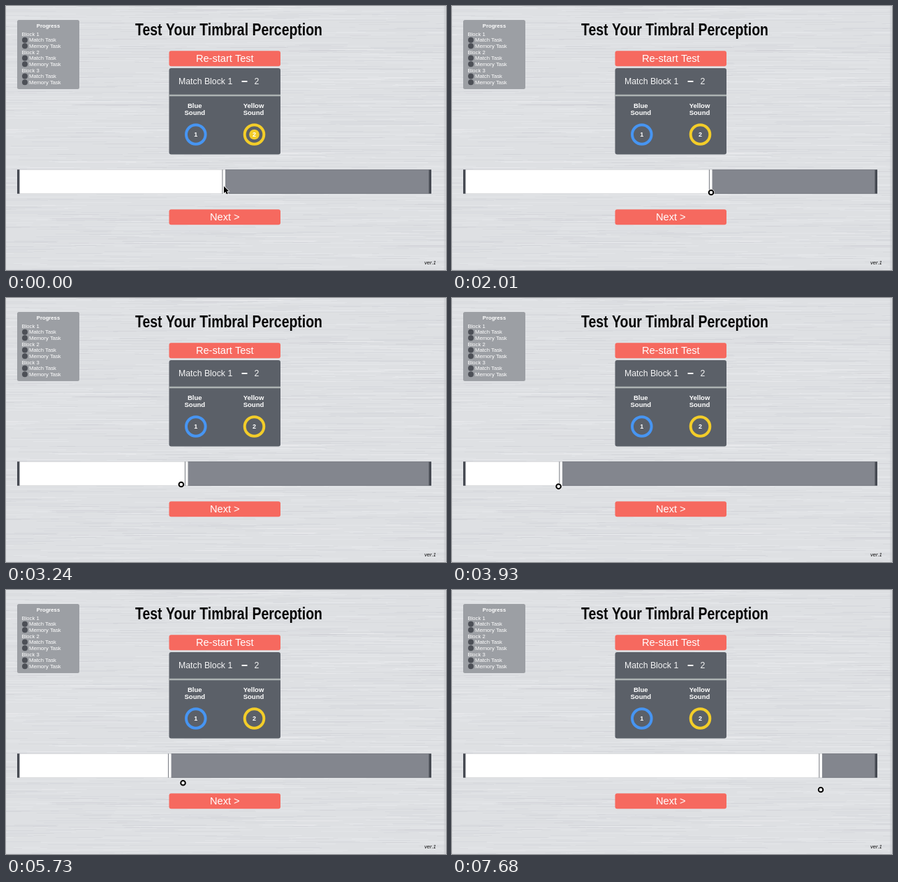
Write an HTML page with a canvas that moves like this. It is 630 by 378 pixels and loops after 7.71 s.

```html
<!DOCTYPE html>
<html lang="en">
<head>
<meta charset="utf-8">
<title>Timbral Perception</title>
<style>
html, body { margin: 0; width: 100%; height: 100%; overflow: hidden; background: #dee0e3; }
canvas { display: block; }
</style>
</head>
<body>
<canvas id="stage" width="630" height="378"></canvas>
<script>
const W = 630, H = 378, LOOP = 7710, PRESS = 330, LAG = 50;
const stage = document.getElementById('stage').getContext('2d');
const backdrop = document.createElement('canvas');
backdrop.width = W;
backdrop.height = H;
let ctx = backdrop.getContext('2d');

// Pointer path: time, x, y
const path = [
  [0, 312, 258], [400, 312, 259], [1020, 341, 264], [2010, 371, 267],
  [2450, 373, 267], [3240, 251, 267], [4000, 150, 270], [4920, 141, 271],
  [5250, 141, 272], [6420, 479, 283], [7000, 515, 285], [7680, 528, 286]
];

function slope(i, k) {
  const a = path[i], b = path[i + 1];
  return a && b ? (b[k] - a[k]) / (b[0] - a[0]) : 0;
}

function tangent(i, k) {
  const a = slope(i - 1, k), b = slope(i, k);
  return a * b > 0 ? 2 * a * b / (a + b) : 0;
}

// Monotone cubic through the path points
function at(t, k) {
  const last = path.length - 1;
  t = Math.min(Math.max(t, 0), path[last][0]);
  let i = 0;
  while (i < last - 1 && t > path[i + 1][0]) i++;
  const a = path[i], b = path[i + 1], d = b[0] - a[0], u = (t - a[0]) / d;
  const ease = u * u * (3 - 2 * u);
  return a[k] + (b[k] - a[k]) * ease
    + d * u * (1 - u) * ((1 - u) * tangent(i, k) - u * tangent(i + 1, k));
}

function rect(x, y, w, h, color, r = 0) {
  ctx.fillStyle = color;
  ctx.beginPath();
  ctx.roundRect(x, y, w, h, r);
  ctx.fill();
}

function disc(x, y, r, color) {
  ctx.fillStyle = color;
  ctx.beginPath();
  ctx.arc(x, y, r, 0, 7);
  ctx.fill();
}

function ring(x, y, r, width, color) {
  ctx.strokeStyle = color;
  ctx.lineWidth = width;
  ctx.beginPath();
  ctx.arc(x, y, r, 0, 7);
  ctx.stroke();
}

function text(str, x, y, size, { style = '', align = 'left', color = '#fff' } = {}) {
  ctx.font = `${style} ${size}px "Liberation Sans", Arial, sans-serif`;
  ctx.textAlign = align;
  ctx.fillStyle = color;
  ctx.fillText(str, x, y);
}

const bold = { style: 'bold', align: 'center' };

function brushedMetal() {
  rect(0, 0, W, H, '#dee0e3');
  let seed = 7;
  const rand = () => (seed = seed * 16807 % 2147483647) / 2147483647;
  for (let i = 0; i < 1100; i++) {
    const color = rand() < 0.5 ? 'rgba(255,255,255,.16)' : 'rgba(150,155,162,.09)';
    rect(rand() * 700 - 70, Math.floor(rand() * H), 25 + rand() * 130, 1, color);
  }
  rect(627, 0, 3, H, 'rgba(200,202,205,.5)');
}

function progress() {
  rect(16, 20, 89, 99, '#9c9fa4', 2.5);
  text('Progress', 60.5, 31, 7.7, bold);
  for (let i = 0; i < 9; i++) {
    const y = 40 + i * 8.65;
    if (i % 3 === 0) {
      text('Block ' + (i / 3 + 1), 22.5, y + 2.8, 7.7);
    } else {
      disc(27, y, 4, '#4d5057');
      text(i % 3 === 1 ? 'Match Task' : 'Memory Task', 33, y + 2.8, 7.7);
    }
  }
}

function button(label, y) {
  rect(233.5, y, 159.5, 22, '#f6695f', 3);
  text(label, 313.3, y + 16, 14.6, { align: 'center' });
}

function sound(name, x, cx, number, color) {
  text(name, x, 145.5, 9.5, bold);
  text('Sound', x, 156, 9.5, bold);
  ring(cx, 184, 13.8, 4, color);
  text(number, cx, 187.3, 9, bold);
}

function drawBackdrop() {
  brushedMetal();
  progress();

  // Narrow bold face for the heading
  ctx.save();
  ctx.translate(319, 42);
  ctx.scale(0.81, 1);
  text('Test Your Timbral Perception', 0, 0, 24, { ...bold, color: '#050505' });
  ctx.restore();

  button('Re-start Test', 64.3);
  button('Next >', 291.3);

  rect(233.5, 89, 159.5, 123.5, '#5b6068', 3);
  rect(233.5, 126.7, 159.5, 2.6, '#adb3b3');
  text('Match Block 1', 247, 112, 12.3, { color: '#f4f4f5' });
  rect(337.5, 107, 8, 2, '#f4f4f5');
  text('2', 359, 112, 12.3, { align: 'center', color: '#f4f4f5' });
  sound('Blue', 270.3, 271.8, '1', '#4795f2');
  sound('Yellow', 354.5, 355.5, '2', '#f3cd29');

  rect(16, 234.3, 593, 34.4, '#464a52');
  rect(19.5, 234.3, 586, 34.4, '#83868e');
  text('ver.1', 599, 370, 7.7, { style: 'italic', color: '#111' });
}

function slider(edge) {
  rect(19.5, 234.3, edge - 19.5, 34.4, '#fff');
  rect(edge - 4.6, 234.3, 1, 34.4, '#777a80');
}

function arrow(x, y) {
  ctx.beginPath();
  for (const [dx, dy] of [[0, 0], [0, 10], [2.3, 8], [4, 11.5], [5.7, 10.7], [4.2, 7.3], [7, 7]]) {
    ctx.lineTo(x + dx, y + dy);
  }
  ctx.closePath();
  ctx.strokeStyle = '#fff';
  ctx.lineWidth = 1.4;
  ctx.stroke();
  ctx.fillStyle = '#000';
  ctx.fill();
}

function pointer(x, y) {
  disc(x, y, 4.8, '#f4f4f4');
  ring(x, y, 3.3, 2, '#000');
}

function frame(now) {
  const t = now % LOOP;
  ctx.drawImage(backdrop, 0, 0);
  slider(at(t - LAG, 1) + 2);
  if (t < PRESS) {
    disc(355.5, 184, 7.3, '#f3cd29');
    text('2', 355.5, 187.3, 9, bold);
    arrow(at(t, 1), at(t, 2));
  } else {
    pointer(at(t, 1), at(t, 2));
  }
  requestAnimationFrame(frame);
}

drawBackdrop();
ctx = stage;
requestAnimationFrame(frame);
</script>
</body>
</html>
```
